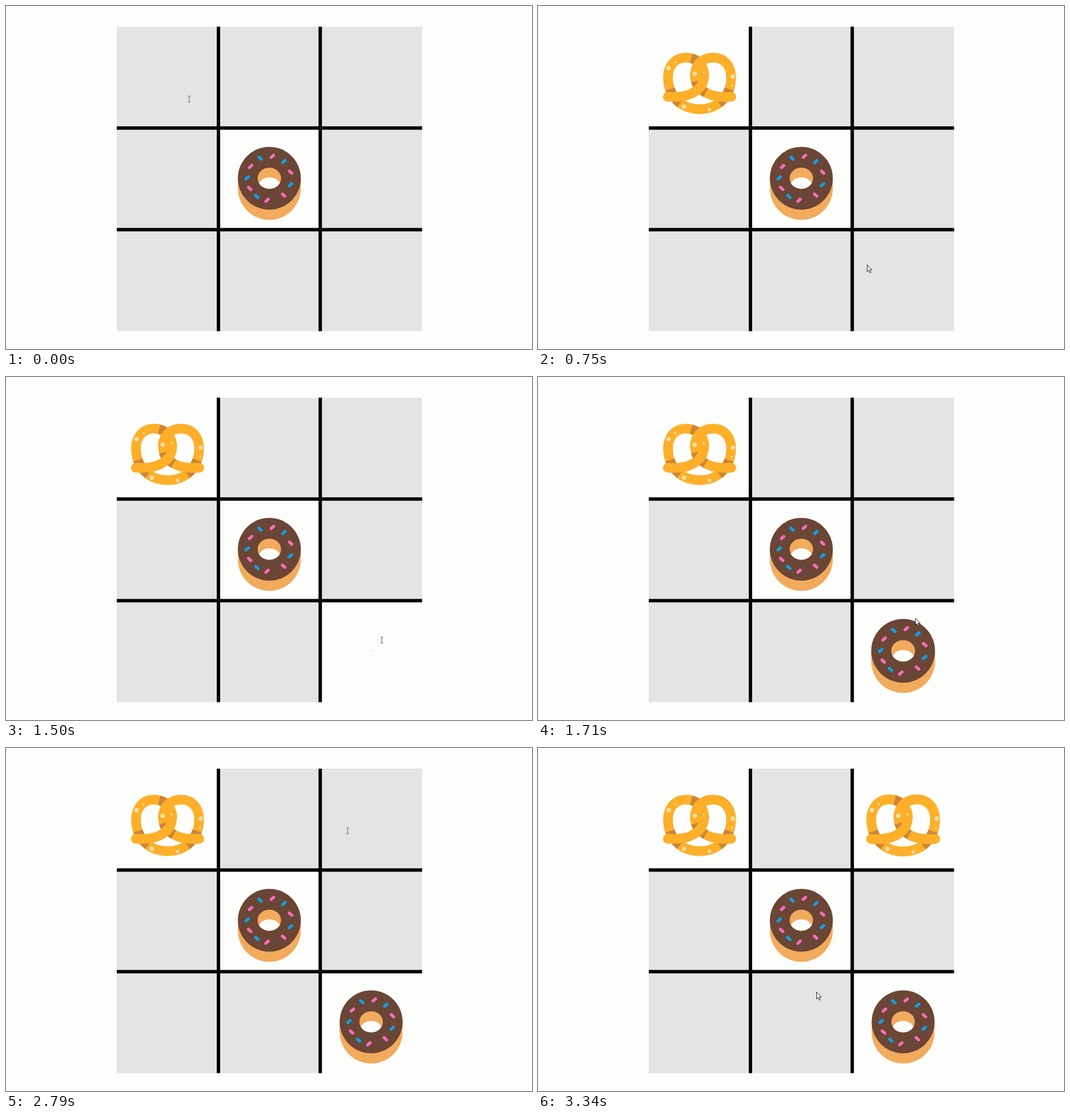
Write an HTML page that moves like this. It is 926 by 605 pixels and loops after 3390 ms.

```html
<!DOCTYPE html>
<html lang="en">
<head>
<meta charset="utf-8">
<title>Pretzels and donuts</title>
<style>
  html, body { margin: 0; width: 100%; height: 100%; overflow: hidden; background: #fdfdfc; }
  svg { display: block; width: 926px; height: 605px; }
  .dough, .shade { fill: none; stroke-width: 17; }
  .dough { stroke: #fdaf29; stroke-linecap: round; }
  .shade { stroke: #cf8535; }
</style>
</head>
<body>
<svg viewBox="0 0 926 605">
  <defs>
    <clipPath id="hole"><ellipse rx="20.7" ry="18.6"/></clipPath>
    <path id="side" pathLength="100" d="M-55.5 1C-55.5 34 -33.5 57.3 0 57.3"/>
    <path id="loop" pathLength="100" d="M-55.5 1C-55.5 -20 -42.5 -33.5 -24.5 -33.5C-2 -33.5 8.2 -18 8.2 -2"/>
    <path id="arm" pathLength="100" d="M8.2 -4C8 6 6 14 0 20C-13.5 33 -29.5 37 -56 35.5"/>
    <g id="ring">
      <use href="#side" class="dough"/>
      <use href="#side" class="shade" stroke-dasharray="0 24 35 100"/>
    </g>

    <!-- icons are centred on their cell -->
    <g id="donut">
      <path d="M-55.4 0V18A55.4 55.4 0 0 0 55.4 18V0Z" fill="#f2aa5d"/>
      <circle r="55.4" fill="#6b4535"/>
      <ellipse rx="20.7" ry="18.6" fill="#f2aa5d"/>
      <ellipse cy="17" rx="20.7" ry="18.6" fill="#fdfdfc" clip-path="url(#hole)"/>
      <g id="sprinkles" stroke-width="5.4" stroke-linecap="round"></g>
    </g>

    <g id="pretzel">
      <use href="#ring"/>
      <use href="#ring" transform="scale(-1 1)"/>
      <use href="#loop" class="dough"/>
      <use href="#loop" class="shade" stroke-dasharray="0 60 16 100"/>
      <g transform="scale(-1 1)">
        <use href="#loop" class="dough"/>
        <use href="#arm" class="dough"/>
        <use href="#arm" class="shade" stroke-dasharray="0 14 32 100"/>
      </g>
      <use href="#arm" class="dough"/>
      <g id="salt" fill="#ffdfa8"><circle cx="17.5" cy="58" r="3"/></g>
    </g>
  </defs>

  <rect x="195" y="36.5" width="537.5" height="537" fill="#e4e4e4"/>
  <g id="cells"></g>
  <g id="lines" stroke="#000" stroke-width="6"></g>
  <g id="icons"></g>

  <path id="arrow" d="M.5 .5V12.6L3.2 10.1L5.2 14.7L7.1 13.9L5.1 9.3H8.8Z" fill="#fff" stroke="#222"/>
  <path id="beam" d="M-2 -5H3M.5 -5V5M-2 5H3" fill="none" stroke="#666"/>
</svg>

<script>
const LOOP = 3390, GROW = 550, PITCH = 179.2, LEFT = 284.4, TOP = 124.6;
const $ = id => document.getElementById(id);

function add(parent, tag, attrs) {
  const el = document.createElementNS("http://www.w3.org/2000/svg", tag);
  for (const key in attrs) el.setAttribute(key, attrs[key]);
  return parent.appendChild(el);
}

const polar = (r, deg) => [r * Math.cos(deg * Math.PI / 180), r * Math.sin(deg * Math.PI / 180)];

for (const k of [0.5, 1.5]) {
  const x = LEFT + k * PITCH, y = TOP + 1 + k * PITCH;
  add($("lines"), "path", { d: `M${x} 36.5V573.5M195 ${y}H732.5` });
}

// Sprinkles sit on an arc, pink and blue in turn; each slash gives the lean.
function sprinkle(from, step, leans) {
  [...leans].forEach((lean, i) => {
    const [x, y] = polar(39, from + step * i);
    const dy = lean === "/" ? 1.9 : -1.9;
    add($("sprinkles"), "line", {
      x1: x - 2.1, y1: y + dy, x2: x + 2.1, y2: y - dy, stroke: i % 2 ? "#0e9fe2" : "#fa6cbe"
    });
  });
}
sprinkle(-148, 33, "/\\//\\/\\");
sprinkle(96, 28.3, "/\\\\/");

// Each big grain has a small one beside it, in the given direction.
for (const [x, y, deg] of [[-54.5, -15, -40], [58.5, 0, 95], [-27.5, 53, 45], [-8.5, -5, -10]]) {
  const [dx, dy] = polar(16, deg);
  add($("salt"), "circle", { cx: x, cy: y, r: 3.9 });
  add($("salt"), "circle", { cx: x + dx, cy: y + dy, r: 1.8 });
}

// time, column, row; donut and pretzel take turns
const moves = [[-GROW, 1, 1], [40, 0, 0], [1500, 2, 2], [2840, 2, 0]].map(([time, col, row], i) => {
  const x = LEFT + col * PITCH, y = TOP + row * PITCH;
  return {
    time, x, y,
    cell: add($("cells"), "rect", { x: x - 91, y: y - 91, width: 182, height: 182, fill: "#fdfdfc" }),
    icon: add($("icons"), "use", { href: i % 2 ? "#pretzel" : "#donut" })
  };
});

// Pointer trips: start, end, bend point, destination
const home = [322, 164];
const trips = [
  [250, 890, [300, 445], [661, 464]],
  [1616, 2090, [683, 278], [587, 93]],
  [2380, 2700, [594, 120], [601, 146]],
  [2920, 3340, [545, 288], [490, 430]]
];

const clamp = p => Math.min(1, Math.max(0, p));
const smooth = p => p * p * (3 - 2 * p);
const pop = p => 1 + 2.7 * (p - 1) ** 3 + 1.7 * (p - 1) ** 2;

function pointerAt(t) {
  let from = home, moving = false;
  for (const [start, end, bend, to] of trips) {
    if (t < start) break;
    const s = smooth(clamp((t - start) / (end - start)));
    moving = t < end;
    from = from.map((a, i) => (1 - s) ** 2 * a + 2 * s * (1 - s) * bend[i] + s * s * to[i]);
  }
  return [...from.map(Math.round), moving];
}

function draw(t) {
  for (const { time, x, y, cell, icon } of moves) {
    const shown = t >= time ? "visible" : "hidden";
    cell.style.visibility = icon.style.visibility = shown;
    icon.setAttribute("transform", `translate(${x} ${y}) scale(${pop(clamp((t - time) / GROW))})`);
  }
  const [x, y, moving] = pointerAt(t);
  const fromTop = (y - TOP + PITCH / 2) % PITCH;
  const onText = !moving && fromTop > 60;
  $("beam").style.visibility = onText ? "visible" : "hidden";
  $("arrow").style.visibility = onText ? "hidden" : "visible";
  for (const id of ["beam", "arrow"]) $(id).setAttribute("transform", `translate(${x} ${y})`);
}

const start = performance.now();
function tick() {
  draw((performance.now() - start) % LOOP);
  requestAnimationFrame(tick);
}
tick();
</script>
</body>
</html>
```
